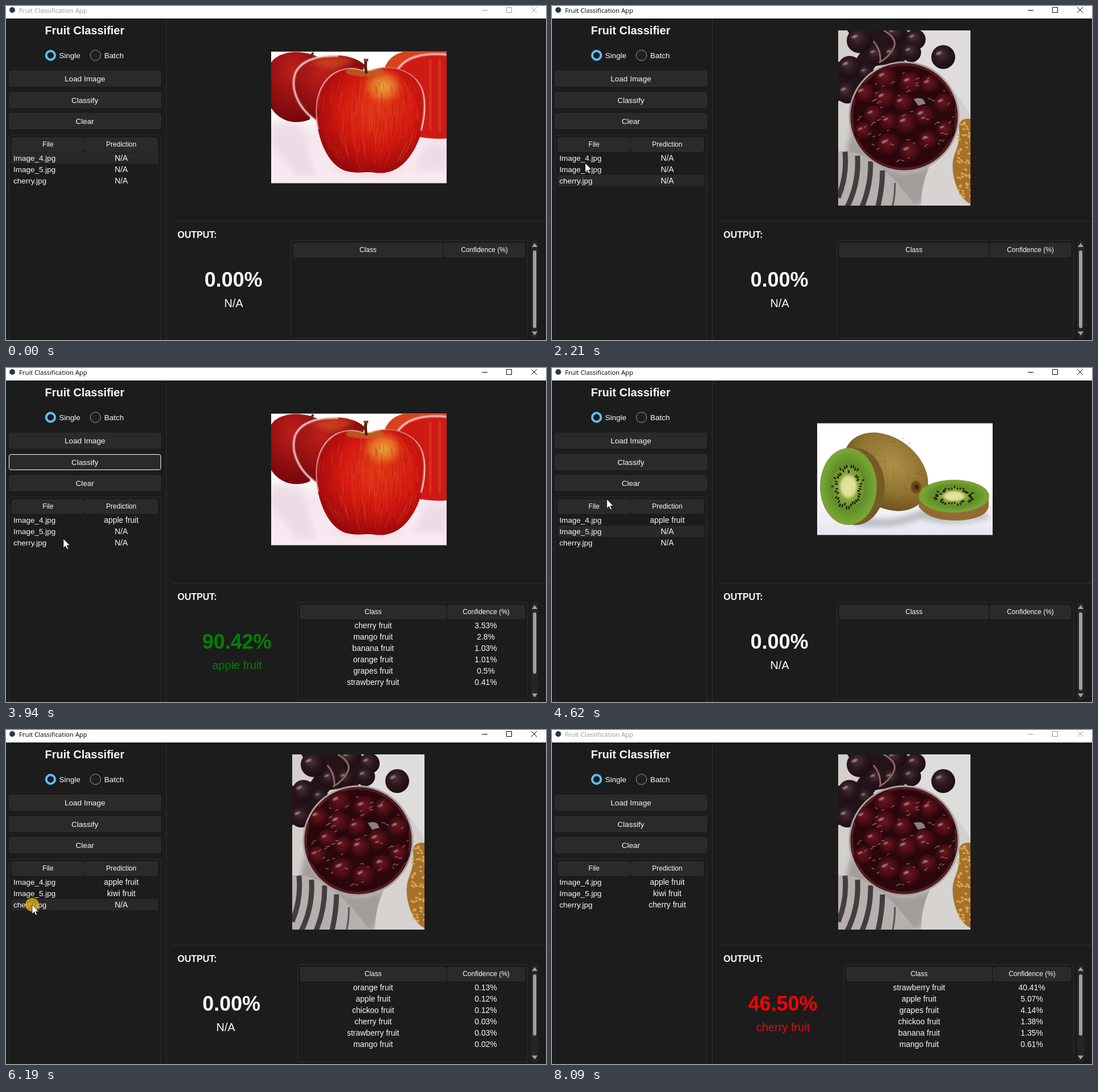
An HTML page that plays this animation: 951x589 px, repeating every 8160 ms.

```html
<!DOCTYPE html>
<html lang="en">
<head>
<meta charset="utf-8">
<title>Fruit Classification App</title>
<style>
html, body { margin: 0; width: 100%; height: 100%; overflow: hidden; background: #1c1c1c; }
svg { display: block; }
text { font: 13.5px "Liberation Sans", Arial, sans-serif; fill: #fafafa; }
.mid { text-anchor: middle; }
.cell { font-size: 13.9px; }
.head { font-size: 12px; }
.bold { font-weight: bold; }
.box { fill: #2a2a2a; stroke: #303030; }
.frame { fill: none; stroke: #2f2f2f; }
</style>
</head>
<body>
<svg width="951" height="589" viewBox="0 0 951 589">
  <defs>
    <linearGradient id="studio" x2="0" y2="1">
      <stop offset=".45" stop-color="#fff"/><stop offset=".65" stop-color="#f6e6ee"/><stop offset="1" stop-color="#fbe9f2"/>
    </linearGradient>
    <radialGradient id="red" cx=".56" cy=".4" r=".62">
      <stop offset="0" stop-color="#e03a18"/><stop offset=".55" stop-color="#d31810"/><stop offset="1" stop-color="#98080b"/>
    </radialGradient>
    <radialGradient id="darkRed" cx=".4" cy=".25" r=".8">
      <stop offset="0" stop-color="#bd1f1a"/><stop offset="1" stop-color="#72040a"/>
    </radialGradient>
    <radialGradient id="gold">
      <stop offset="0" stop-color="#eda63c"/><stop offset=".5" stop-color="#e8802b" stop-opacity=".75"/><stop offset="1" stop-color="#e0401c" stop-opacity="0"/>
    </radialGradient>
    <linearGradient id="table" x2="0" y2="1">
      <stop offset=".55" stop-color="#fff"/><stop offset="1" stop-color="#e6e6ee"/>
    </linearGradient>
    <radialGradient id="skin" cx=".5" cy=".35" r=".65">
      <stop offset="0" stop-color="#ad924a"/><stop offset=".6" stop-color="#917331"/><stop offset="1" stop-color="#6b4d1b"/>
    </radialGradient>
    <radialGradient id="flesh">
      <stop offset="0" stop-color="#e6e5a8"/><stop offset=".24" stop-color="#dcdc94"/><stop offset=".34" stop-color="#8aa83c"/>
      <stop offset=".6" stop-color="#5f8c28"/><stop offset=".92" stop-color="#74a632"/><stop offset="1" stop-color="#8a9a42"/>
    </radialGradient>
    <radialGradient id="berry" cx=".45" cy=".4" r=".6">
      <stop offset="0" stop-color="#6a1720"/><stop offset=".55" stop-color="#480c14"/><stop offset="1" stop-color="#240509"/>
    </radialGradient>
    <radialGradient id="plum" cx=".42" cy=".38" r=".62">
      <stop offset="0" stop-color="#4b303a"/><stop offset=".5" stop-color="#2c181f"/><stop offset="1" stop-color="#1b0d12"/>
    </radialGradient>
    <filter id="soft"><feGaussianBlur stdDeviation="5"/></filter>
    <filter id="smooth"><feGaussianBlur stdDeviation="1"/></filter>
    <clipPath id="wide"><path d="M467 80.500h309v232H467z"/></clipPath>
    <clipPath id="tall"><path d="M504 43h233v309H504z"/></clipPath>
    <clipPath id="cut"><path d="M513 400h420v189H513z"/></clipPath>
    <clipPath id="jar"><circle cx="620" cy="195" r="94"/></clipPath>
    <clipPath id="appleShape"><path id="applePath" d="M634 116C613 104 583 108 565 128C544 151 542 187 550 221C558 257 577 287 603 292C622 296 635 291 650 294C680 298 704 282 721 249C737 218 744 175 734 147C722 113 675 97 634 116Z"/></clipPath>
  </defs>

  <path fill="#fff" d="M0 0h951v22H0z"/>
  <circle cx="11" cy="7" r="5" fill="#24394a"/>
  <g id="bar">
    <text x="23" y="12" style="font:11.3px 'Open Sans','Noto Sans',sans-serif;fill:currentColor">Fruit Classification App</text>
    <path fill="none" stroke="currentColor" d="M838 7.500h10M881.500 2.500h9v9h-9zM925 2l10 10M935 2l-10 10"/>
  </g>
  <path stroke="#2f2f2f" d="M282.500 22v567M293 379.500h658"/>
  <text class="mid bold" x="138.500" y="50" style="font-size:20px">Fruit Classifier</text>
  <circle cx="78.500" cy="87" r="7.700" fill="#1c1c1c" stroke="#5fbdf3" stroke-width="4"/>
  <circle cx="157.500" cy="87" r="9.200" fill="#202020" stroke="#9c9c9c"/>
  <text x="93.500" y="92">Single</text>
  <text x="173" y="92">Batch</text>
  <rect class="frame" x="5.500" y="227.500" width="267" height="363" rx="4"/>
  <text class="bold" x="302" y="409" style="font-size:16px">OUTPUT:</text>
  <rect x="925" y="413" width="12" height="173" rx="6" fill="#252525"/>
  <path fill="#a0a0a0" d="M931 418l5 7h-10zM931 581l5-7h-10z"/>

  <g id="photos">
    <g clip-path="url(#wide)">
      <path fill="url(#studio)" d="M467 80h309v233H467z"/>
      <path fill="#e6d5df" opacity=".6" filter="url(#soft)" d="M467 205L520 208L545 300H510L467 240zM560 285q80 30 160 0l20-40h36v45z"/>
      <path fill="#d8421c" d="M667 108Q680 78 720 79H776V130z"/>
      <path fill="url(#darkRed)" d="M467 100C480 78 528 74 560 96L535 200C505 212 480 200 467 180z"/>
      <path fill="url(#darkRed)" d="M556 208C518 188 500 150 509 120C520 86 600 74 632 104L600 200z"/>
      <path fill="#e05a26" opacity=".55" filter="url(#soft)" d="M535 100q40-20 80-4l-40 16z"/>
      <path fill="#cf1a14" d="M686 118C705 82 750 78 782 86V233Q755 236 728 231z"/>
      <path stroke="#e5542a" stroke-width="5" opacity=".4" filter="url(#smooth)" d="M747 95v125M764 92v130"/>
      <path fill="none" stroke="#fbe3df" stroke-width="3" filter="url(#smooth)" d="M556 208C518 188 500 150 509 120C518 96 550 86 585 88M690 112C705 88 740 82 776 86"/>
      <path d="M536 91l5-9" stroke="#5c2a17" stroke-width="4"/>
      <use href="#applePath" fill="url(#red)"/>
      <g clip-path="url(#appleShape)">
        <ellipse cx="664" cy="142" rx="42" ry="36" fill="url(#gold)"/>
        <ellipse cx="632" cy="116" rx="34" ry="8" fill="#b96a28" opacity=".75" filter="url(#smooth)"/>
        <path id="streaks" fill="none" stroke="#ec8f3e" opacity=".22"/>
        <path id="stripes" fill="none" stroke="#9c080c" opacity=".3" stroke-width="1.500"/>
        <path fill="none" stroke="#ffe6e2" stroke-width="4" opacity=".9" filter="url(#smooth)" d="M549 218C541 185 544 151 565 128C583 108 610 104 630 113M640 113C680 97 722 113 734 147C741 170 738 195 732 220"/>
      </g>
      <path fill="none" stroke="#54210f" stroke-width="5" d="M635 119Q632 106 634 96"/>
      <path stroke="#7d4424" stroke-width="8" d="M634 93v4"/>
    </g>
    <g>
      <path fill="url(#table)" d="M467 97.500h309v197H467z"/>
      <path fill="#9a9aa5" opacity=".6" filter="url(#soft)" d="M545 262q50 14 110-14l20 10q50 20 90-4l5 10q-60 20-120 2-60 22-120 10z"/>
      <ellipse cx="588" cy="183" rx="82" ry="60" transform="rotate(38 588 183)" fill="url(#skin)"/>
      <path id="fuzz" fill="none" stroke="#5d4518" opacity=".4"/>
      <ellipse cx="641" cy="210" rx="9" ry="11" fill="#6e4417" filter="url(#smooth)"/><circle cx="642" cy="210" r="4" fill="#40240d"/>
      <ellipse cx="534" cy="209" rx="52" ry="68" fill="#765a25"/>
      <ellipse cx="522" cy="209" rx="50" ry="68" fill="url(#flesh)"/>
      <path fill="#936b2e" d="M646 226v19Q665 270 714 269Q762 267 769 246v-20z"/>
      <ellipse cx="708" cy="226" rx="62" ry="29" fill="url(#flesh)"/>
      <path id="seeds" fill="none" stroke="#20230f" stroke-width="2.600" stroke-linecap="round"/>
    </g>
    <g clip-path="url(#tall)">
      <path fill="#d2cfcd" d="M504 43h233v309H504z"/>
      <path fill="#dfdddb" d="M640 43h97v150q-30-60-97-90z"/>
      <path fill="#a29d9b" filter="url(#soft)" d="M528 215q30 70 92 78 60-4 90-50-40 60-62 109h-30q-30-50-100-90z"/>
      <path fill="#b5b0ad" d="M504 256q40-2 75 28t60 68H504z"/>
      <path fill="none" stroke="#413d40" stroke-width="9" d="M516 257Q520 300 504 338M538 264Q541 312 520 354M561 274Q562 316 546 354M582 290Q582 320 574 354"/>
      <path fill="none" stroke="#5a5558" stroke-width="3" d="M604 312q0 22-4 40"/>
      <path fill="#d6d3d1" d="M650 352q0-90 87-150v150z"/>
      <path fill="#a8712a" d="M737 199q-22-2-20 18t-7 42 0 52 27 38z"/>
      <path id="crumbs" fill="none" stroke="#d9a650" stroke-width="3" stroke-linecap="round"/>
      <path fill="#24141a" d="M520 43h105l15 25-20 30-50 8-38 50-28 12v-70l25 5 15-22z"/>
      <g id="plums"></g>
      <path fill="none" stroke="#8f695e" stroke-width="3" d="M584 43q25 14 18 30T576 100M566 62q14 16 12 36"/>
      <circle cx="620" cy="195" r="96" fill="#2b070c" stroke="#aaa3a1" stroke-width="3"/>
      <circle cx="620" cy="195" r="92" fill="none" stroke="#561a20" stroke-width="4"/>
      <g clip-path="url(#jar)">
        <g id="berries"></g>
        <path id="glints" fill="none" stroke="#b98a8e" stroke-width="1.500" stroke-linecap="round" opacity=".65"/>
      </g>
      <path fill="#a59ba0" opacity=".8" d="M637 164q18-5 20 8l-12 4z"/>
    </g>
  </g>
  <g id="ui"></g>
  <circle id="click" r="12" fill="#e6b414" opacity=".75"/>
  <path id="pointer" fill="#fff" stroke="#111" stroke-width=".8" d="M0 0V16.500L3.800 12.900L6.300 18.600L8.800 17.500L6.300 12H11.500Z"/>
</svg>
<script>
const $ = id => document.getElementById(id);
const LOOP = 8160, LAG = 70;

// --- photo details ---
let seed = 7;
const rnd = (a, b) => a + (b - a) * ((seed = seed * 16807 % 2147483647) / 2147483647);
const repeat = (n, f) => Array.from({ length: n }, (_, i) => f(i)).join("");
const polar = (x, y, rx, ry, a, r) => `${(x + rx * r * Math.cos(a)).toFixed(1)} ${(y + ry * r * Math.sin(a)).toFixed(1)}`;

const meridian = () => {
  const u = rnd(-1, 1), y = rnd(120, 260), end = y + rnd(8, 34);
  const at = v => 641 + u * 95 * Math.sqrt(Math.max(.1, 1 - ((v - 190) / 112) ** 2));
  return `M${at(y)} ${y}L${at(end)} ${end}`;
};
$("streaks").setAttribute("d", repeat(110, meridian));
$("stripes").setAttribute("d", repeat(90, meridian));
const seedRing = (x, y, rx, ry, n) => repeat(n, i => {
  const a = i * Math.PI * 2 / n, r = rnd(.36, .54);
  return `M${polar(x, y, rx, ry, a, r)}L${polar(x, y, rx, ry, a, r + .05)}`;
});
$("seeds").setAttribute("d", seedRing(521, 209, 50, 68, 42) + seedRing(709, 226, 62, 29, 36));
$("fuzz").setAttribute("d", repeat(160, () =>
  `M${polar(596, 180, 56, 62, rnd(-2.6, 1.4), Math.sqrt(rnd(0, 1)))}l2 1`));
$("crumbs").setAttribute("d", repeat(60, () => `M${rnd(714, 737)} ${rnd(203, 338)}l2 1`));
$("glints").setAttribute("d", repeat(60, () =>
  `M${polar(620, 195, 86, 82, rnd(0, 6.3), Math.sqrt(rnd(0, 1)))}l${rnd(2, 6)} ${rnd(-4, 2)}`));

const balls = (id, fill, spots) => $(id).innerHTML = spots.split(" ").map(s => {
  const [x, y, r] = s.split(",").map(Number);
  return `<circle cx="${x}" cy="${y}" r="${r}" fill="url(#${fill})"/>
    <ellipse cx="${x - r * .2}" cy="${y - r * .45}" rx="${r * .26}" ry="${r * .11}" transform="rotate(-25 ${x} ${y})" fill="#d8c3c6" opacity=".6" filter="url(#smooth)"/>`;
}).join("");
balls("plums", "plum", "541,61,22 520,153,19 524,108,20 571,86,17 605,49,18 640,59,18 633,82,17 599,85,16 553,118,14 689,90,21");
balls("berries", "berry", "588,128,21 632,137,21 666,139,18 551,155,19 691,173,19 587,164,20 619,172,18 567,193,18 656,195,20 594,205,17 625,208,20 549,222,17 693,219,17 663,238,18 593,246,21 631,258,20");

// --- app state ---
const files = ["Image_4.jpg", "Image_5.jpg", "cherry.jpg"];
const results = [
  { name: "apple fruit", score: "90.42%", color: "#008000", rows: "cherry 3.53,mango 2.8,banana 1.03,orange 1.01,grapes 0.5,strawberry 0.41" },
  { name: "kiwi fruit", score: "99.52%", color: "#008000", rows: "orange 0.13,apple 0.12,chickoo 0.12,cherry 0.03,strawberry 0.03,mango 0.02" },
  { name: "cherry fruit", score: "46.50%", color: "#f00", rows: "strawberry 40.41,apple 5.07,grapes 4.14,chickoo 1.38,banana 1.35,mango 0.61" }
];
// time, file, classified
const events = [[0, 0, 0], [810, 1, 0], [1610, 2, 0], [2450, 0, 0], [3460, 0, 1],
  [4280, 1, 0], [5430, 1, 1], [6185, 2, 0], [7210, 2, 1]];
const clicks = [800, 1600, 2440, 3245, 4270, 5225, 6180, 6995];
const focus = [[3250, 4280], [5230, 6185], [7000, 8020]];
// time, x, y
const path = [[130, 330, 547], [760, 68, 287], [1000, 68, 287], [1200, 49, 316], [1530, 49, 316], [1600, 49, 312],
  [1760, 49, 312], [2350, 60, 271], [2520, 60, 270], [2840, 139.500, 222], [3120, 140, 157], [3430, 140, 157],
  [3940, 101, 301], [4200, 68, 290], [4380, 68, 290], [4900, 132, 158], [5340, 132, 157], [5440, 122, 190],
  [5900, 46, 308], [6260, 46, 308], [6540, 140, 168], [7200, 140, 168], [7350, 232, 215], [7560, 400, 600]];

function pointerAt(t) {
  const i = path.findIndex(p => p[0] > t);
  if (i < 1) return null;
  const [a, b] = [path[i - 1], path[i]];
  const k = (t - a[0]) / (b[0] - a[0]), e = k * k * (3 - 2 * k);
  return [1, 2].map(n => a[n] + (b[n] - a[n]) * e);
}

const text = (x, y, s, cls, style = "") => `<text x="${x}" y="${y}" class="${cls}" style="${style}">${s}</text>`;
const rect = (x, y, w, h, cls, extra = "") =>
  `<rect x="${x + .5}" y="${y + .5}" width="${w - 1}" height="${h - 1}" rx="3" class="${cls}" ${extra}/>`;
const header = (x, y, w, s) => rect(x, y, w, 25, "box") + text(x + w / 2, y + 16, s, "mid head");

function button(y, s, hover, ring) {
  return rect(5, y, 268, 28, "box", `style="${hover ? "fill:#2f2f2f;" : ""}${ring ? "stroke:#fff" : ""}"`)
    + text(139, y + 19, s, "mid");
}

function fileList(s) {
  return header(10, 232, 128, "File") + header(139, 232, 128, "Prediction") + files.map((f, i) => {
    const y = 258 + i * 20;
    return (!s.done && s.file === i ? `<path fill="#292929" d="M10 ${y}h258v20H10z"/>` : "")
      + text(13, y + 15, f, "") + text(203, y + 15, s.known[i] ? results[i].name : "N/A", "mid cell");
  }).join("");
}

function output(s) {
  const wide = s.done !== s.fresh;      // the layout follows the labels one step late
  const stale = s.fresh && !s.done;
  const left = wide ? 513 : 501, split = wide ? 776 : 770;
  const r = results[s.file], list = s.done ? r.rows : stale ? results[s.before].rows : "";
  const mid = wide ? 406.500 : 400.500, color = `fill:${s.done ? r.color : "#fafafa"};font-size:`;
  const rows = list && list.split(",").map((row, i) => {
    const [name, n] = row.split(" "), y = 459 + i * 20;
    return text((left + split + 4) / 2, y, name + " fruit", "mid cell") + text((split + 914) / 2, y, n + "%", "mid cell");
  }).join("");
  return text(stale ? 397 : mid, 495, s.done ? r.score : "0.00%", "mid bold", color + "36px")
    + text(stale ? 387 : mid + .5, 531, s.done ? r.name : "N/A", "mid", color + "20px")
    + `<g ${s.fresh && s.done ? 'clip-path="url(#cut)"' : ""}>` + rect(left, 413, 919 - left, 173, "frame")
    + header(left + 5, 418, split - left - 6, "Class") + header(split + 1, 418, 913 - split, "Confidence (%)") + rows + "</g>"
    + `<rect x="928" y="431" width="6" height="${list ? 108 : 137}" rx="3" fill="#a0a0a0"/>`;
}

let shown;
function draw(t) {
  const past = events.filter(e => e[0] <= t), [start, file, done] = past.at(-1), prev = past.at(-2);
  const p = pointerAt(t), over = (a, b) => !!p && p[0] > 4 && p[0] < 273 && p[1] >= a && p[1] < b;
  const s = {
    file, done: !!done, before: prev ? prev[1] : 0,
    fresh: !!prev && prev[2] !== done && t - start < LAG,
    known: files.map((_, i) => past.some(e => e[1] === i && e[2])),
    hover: [over(114, 142), over(150, 192), over(192, 224)],
    ring: focus.some(([a, b]) => t >= a && t < b)
  };
  const key = JSON.stringify(s);
  if (key !== shown) {
    shown = key;
    [...$("photos").children].forEach((g, i) => g.style.display = i === file ? "" : "none");
    $("ui").innerHTML = button(114, "Load Image", s.hover[0]) + button(152, "Classify", s.hover[1], s.ring)
      + button(189, "Clear", s.hover[2]) + fileList(s) + output(s);
  }
  $("bar").style.color = t >= 800 && t < 8020 ? "#000" : "#999";
  const pressed = p && clicks.some(c => t >= c && t < c + 150);
  $("pointer").style.display = p ? "" : "none";
  $("click").style.display = pressed ? "" : "none";
  if (p) for (const id of ["pointer", "click"]) $(id).setAttribute("transform", `translate(${p})`);
}

const begin = performance.now();
function tick() {
  draw((performance.now() - begin) % LOOP);
  requestAnimationFrame(tick);
}
tick();
</script>
</body>
</html>
```
